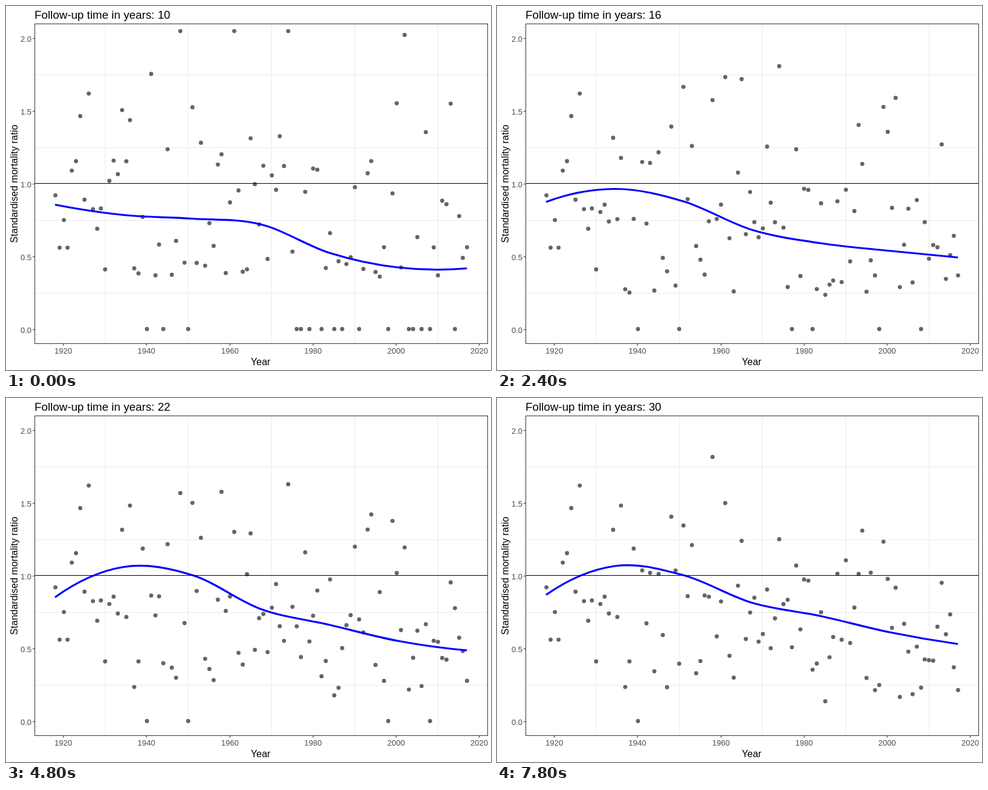
Recreate the animation shown at these times as an HTML page. Size 800 by 600 pixels, loop 8000 ms.

```html
<!DOCTYPE html>
<html lang="en">
<head>
<meta charset="utf-8">
<title>Standardised mortality ratio by follow-up time</title>
<style>
  html, body { margin: 0; width: 100%; height: 100%; overflow: hidden; background: #fff; }
  svg { display: block; width: 800px; height: 600px; font-family: "Liberation Sans", Arial, sans-serif; }
  .grid { stroke: #ebebeb; }
  .tick { stroke: #333; }
  .label { font-size: 13px; fill: #4d4d4d; }
  .axis { font-size: 16px; text-anchor: middle; }
  #heading { font-size: 18.75px; }
  #dots { fill: #646464; }
  #curve { fill: none; stroke: #00f; stroke-width: 3.2; stroke-linejoin: round; }
</style>
</head>
<body>
<svg viewBox="0 0 800 600">
  <text id="heading" x="47" y="21"></text>
  <g id="scales"></g>
  <g id="dots"></g>
  <path id="curve"/>
  <path d="M48 292.5H794" stroke="#000"/>
  <rect x="47.5" y="29.5" width="747" height="527" fill="none" stroke="#333"/>
  <text class="axis" x="420" y="592">Year</text>
  <text class="axis" transform="translate(19 293) rotate(-90)">Standardised mortality ratio</text>
</svg>
<script>
const STEP = 200, STEPS = 40, FIRST = 10;
const FIRST_YEAR = 1918, YEARS = 100;
const $ = id => document.getElementById(id);
const yearX = year => 94.6 + (year - 1920) * 6.863;
const ratioY = ratio => 533 - ratio * 239.6;
const lerp = (a, b, p) => a + (b - a) * p;

// The oldest cohorts are complete from the start
const complete = [0.92, 0.56, 0.75, 0.56, 1.09, 1.155, 1.465, 0.89, 1.62, 0.825, 0.69, 0.83, 0.41];

// Follow-up time: curve heights at seven evenly spaced years
const curves = [
  [10, [327.5, 344.5, 350.5, 360, 407, 431, 432.5]],
  [12, [335, 298.5, 309, 359, 405.5, 412.5, 378]],
  [16, [323, 301.5, 322, 369, 391, 403.5, 414.5]],
  [20, [318, 292.5, 313.5, 363, 388, 411.5, 422.5]],
  [22, [328.5, 278.5, 292, 348, 374, 400.5, 416]],
  [29.5, [324.5, 277, 292, 337.5, 359.5, 386, 405.5]]
];

function random(a, b) {
  const v = Math.sin(a * 12.9898 + b * 78.233) * 43758.5453;
  return v - Math.floor(v);
}

// Observed deaths over expected deaths; deaths arrive at random as follow-up
// grows, and a cohort stops changing once it is complete
function ratio(i, followUp) {
  if (i < complete.length) return complete[i];
  const time = Math.min(followUp, i);
  const expected = (1.4 + 1.4 * random(i, 1)) * (time / 10) ** 0.9;
  const exposure = expected * lerp(1.15, 0.5, i / YEARS);
  let deaths = -1;
  for (let sum = 0; sum <= exposure; deaths++) sum -= Math.log(1 - random(i, deaths + 5));
  return Math.min(deaths / expected, 2.05);
}

function dotY(i, time) {
  const whole = Math.floor(time);
  return ratioY(lerp(ratio(i, whole), ratio(i, whole + 1), time - whole)) - 0.5;
}

function curvePath(time) {
  const n = Math.max(1, curves.findIndex(([at]) => at >= time));
  const [[t0, from], [t1, to]] = [curves[n - 1], curves[n]];
  const h = from.map((y, i) => lerp(y, to[i], (time - t0) / (t1 - t0)));
  const last = h.length - 1, gap = (YEARS - 1) / last;
  // Slopes come from neighbours; beyond the ends the curve goes on as a parabola
  const at = i => i < 0 ? 3 * h[0] - 3 * h[1] + h[2]
    : i > last ? 3 * h[last] - 3 * h[last - 1] + h[last - 2] : h[i];
  const x = i => yearX(FIRST_YEAR + i * gap);
  const slope = i => (at(i + 1) - at(i - 1)) / 6;
  let d = `M${x(0)} ${h[0]}`;
  for (let i = 1; i <= last; i++) {
    d += `C${x(i - 2 / 3)} ${h[i - 1] + slope(i - 1)} ${x(i - 1 / 3)} ${h[i] - slope(i)} ${x(i)} ${h[i]}`;
  }
  return d;
}

function add(parent, tag, attrs, text = "") {
  const node = document.createElementNS("http://www.w3.org/2000/svg", tag);
  for (const key in attrs) node.setAttribute(key, attrs[key]);
  node.textContent = text;
  return parent.appendChild(node);
}

const pixel = v => Math.floor(v) + 0.5;
const rule = (cls, d) => add($("scales"), "path", { class: cls, d });
const label = (text, x, y, anchor) =>
  add($("scales"), "text", { class: "label", x, y, "text-anchor": anchor }, text);

for (let year = 1930; year < 2020; year += 20) rule("grid", `M${pixel(yearX(year))} 30V556`);
for (let r = 0.25; r < 2; r += 0.5) rule("grid", `M48 ${pixel(ratioY(r))}H794`);
for (let year = 1920; year <= 2020; year += 20) {
  const x = pixel(yearX(year));
  rule("tick", `M${x} 557V560`);
  label(year, x, 573, "middle");
}
for (let r = 0; r <= 2; r += 0.5) {
  const y = pixel(ratioY(r));
  rule("tick", `M44 ${y}H47`);
  label(r.toFixed(1), 42, y + 5, "end");
}

const dots = Array.from({ length: YEARS }, (_, i) =>
  add($("dots"), "circle", { cx: Math.round(yearX(FIRST_YEAR + i)) + 0.5, r: 3.4 }));

function draw(step) {
  const time = FIRST + step / 2;
  $("heading").textContent = "Follow-up time in years: " + Math.round(time);
  dots.forEach((dot, i) => dot.setAttribute("cy", dotY(i, time)));
  $("curve").setAttribute("d", curvePath(time));
}

const begin = performance.now();
let shown = -1;
function tick() {
  const step = Math.floor((performance.now() - begin) / STEP) % STEPS;
  if (step !== shown) draw(shown = step);
  requestAnimationFrame(tick);
}
tick();
</script>
</body>
</html>
```
